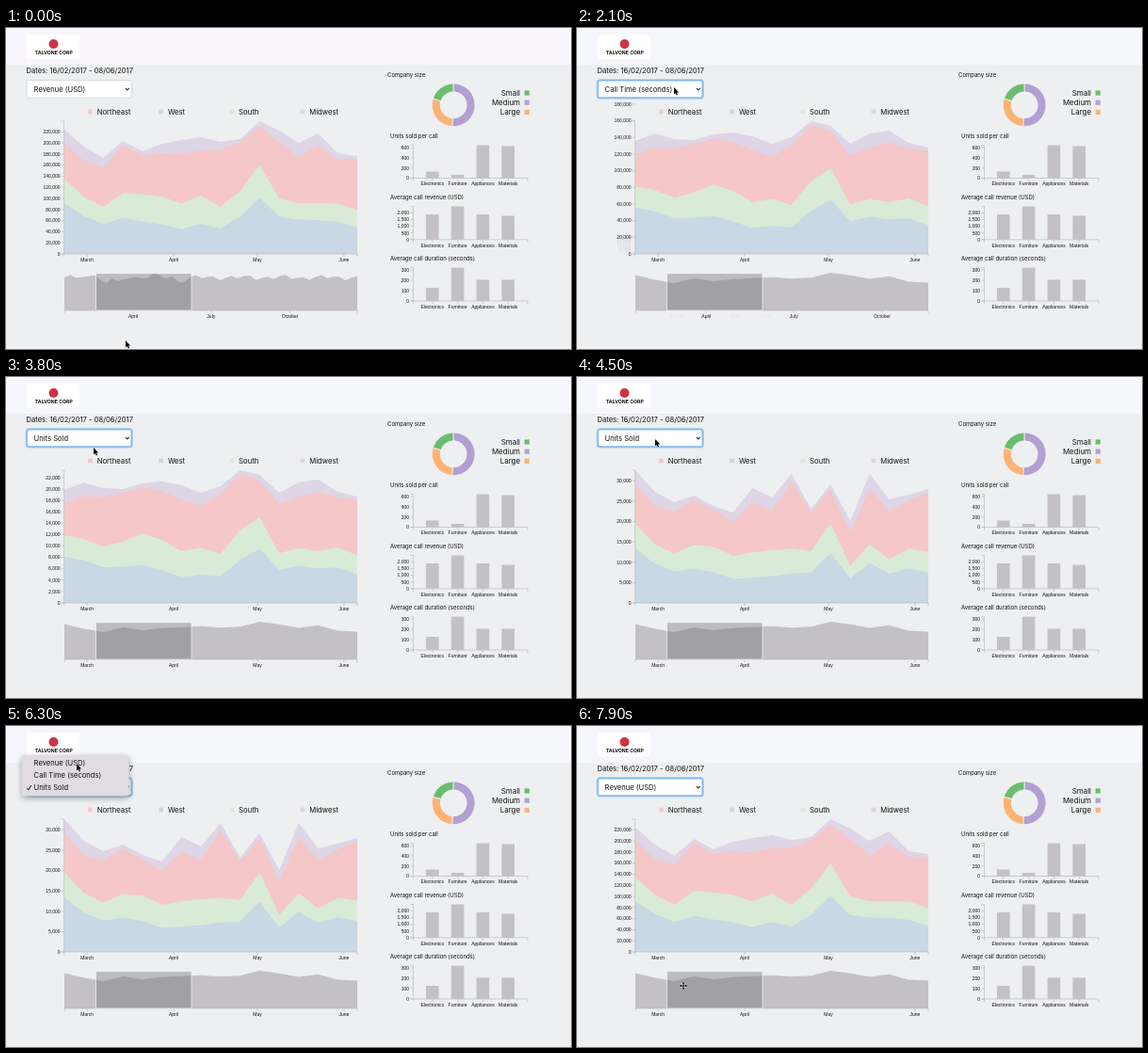
These frames come from a looping animation (600 by 341 pixels, 8 s). An HTML page with a canvas:

```html
<!DOCTYPE html>
<html lang="en">
<head>
<meta charset="utf-8">
<title>Sales dashboard</title>
<style>
html, body { margin: 0; width: 100%; height: 100%; overflow: hidden; background: #edeff0; }
canvas { display: block; }
</style>
</head>
<body>
<canvas id="stage" width="600" height="341"></canvas>
<script>
const c = document.getElementById('stage').getContext('2d');
const LOOP = 8000, TWEEN = 500;
const LEFT = 62, RIGHT = 373, BASE = 240, HEIGHT = 141;
const INK = '#111', AXIS = '#b3b4b8', GREY = '#c3c1c3';
const UI = 'Inter, sans-serif', PLAIN = '"Liberation Sans", Arial, sans-serif';
const OPTIONS = ['Revenue (USD)', 'Call Time (seconds)', 'Units Sold'];

// Weekly totals as heights on the stage
const SETS = [
  { max: 239000, step: 20000,
    total: [132, 114, 102, 120, 109, 117, 121, 124, 119, 122, 141, 131, 118, 128, 107, 104] },
  { max: 23300, step: 2000,
    total: [120, 128, 122, 121, 127, 129, 125, 117, 124, 141, 136, 117, 128, 131, 118, 113] },
  { max: 32640, step: 5000,
    total: [141, 118, 107, 114, 103, 96, 122, 112, 137, 100, 126, 87, 137, 110, 115, 121] }];
// Share of the two lower regions in each week's total
const SHARE = [.6, .53, .49, .54, .58, .52, .44, .5, .42, .55, .67, .45, .455, .42, .5, .45];
const CHANGES = [[0, 0], [1982, 1], [3880, 2], [6480, 0]];

// Stacked regions from the top down: colour and upper edge
const LAYERS = [
  ['#ded5e6', h => h],
  ['#f5c7c8', (h, i) => h - 9.5 - 6 * Math.cos(1.1 * i - 0.7)],
  ['#d9ebd7', (h, i) => h * SHARE[i]],
  ['#cad7e4', (h, i) => h * SHARE[i] * (0.59 + 0.09 * Math.cos(0.52 * i))]];
const LEGEND = { Northeast: 1, West: 3, South: 2, Midwest: 0 };

// Overview strip: sixteen weeks, or the whole year around them
const spring = SETS[0].total.map(h => h * 0.284);
const year = Array.from({ length: 50 }, (_, i) =>
  spring[i - 5] ?? 35 + 2 * Math.sin(2.1 * i) + 1.2 * Math.sin(0.9 * i));

// Days are counted from 1 April
const MONTHS = { '-31': 'March', 0: 'April', 30: 'May', 61: 'June', 91: 'July', 183: 'October' };
const QUARTERS = [0, 91, 183], SPRING = [-31, 0, 30, 61];

// open, close, selected option
const MENUS = [[850, 1700, 0], [2700, 3780, 1], [5400, 6400, 2]];
// start, end, x, y
const MOVES = [[0, 1, 127, 332], [150, 750, 92, 64], [1150, 1500, 99, 76], [1800, 2050, 103, 63],
  [2750, 3050, 93, 75], [3800, 4300, 83, 66], [5600, 6080, 75, 40], [7130, 7600, 113, 276]];

const mix = (a, b, e) => a + (b - a) * e;
const cubic = p => p < 0.5 ? 4 * p ** 3 : 1 - 4 * (1 - p) ** 3;
const range = (max, step) =>
  Array.from({ length: Math.floor(max / step) + 1 }, (_, i) => i * step);

function text(s, x, y, size, { align = 'left', color = INK, font = UI, weight = '' } = {}) {
  c.font = `${weight} ${size}px ${font}`;
  c.textAlign = align;
  c.fillStyle = color;
  c.fillText(s, x, y);
}
function rect(x, y, w, h, color) {
  c.fillStyle = color;
  c.fillRect(x, y, w, h);
}
function box(x, y, w, h, r, color) {
  c.beginPath();
  c.roundRect(x, y, w, h, r);
  c.fillStyle = color;
  c.fill();
}
function outline(color, width) {
  c.strokeStyle = color;
  c.lineWidth = width;
  c.stroke();
}
function line(color, width, ...p) {
  c.beginPath();
  for (let i = 0; i < p.length; i += 2) c.lineTo(p[i], p[i + 1]);
  outline(color, width);
}
function area(heights, base, color) {
  c.beginPath();
  c.moveTo(LEFT, base);
  heights.forEach((h, i) => c.lineTo(mix(LEFT, RIGHT, i / (heights.length - 1)), base - h));
  c.lineTo(RIGHT, base);
  c.fillStyle = color;
  c.fill();
}
function clipped(x, y, w, h, draw) {
  c.save();
  c.beginPath();
  c.rect(x, y, w, h);
  c.clip();
  draw();
  c.restore();
}

function axes(x, right, top, base) {
  line(AXIS, 0.6, x - 3, top, x, top, x, base, x - 3, base);
  line(AXIS, 0.6, x, base + 3, x, base, right, base, right, base + 3);
}
function yTick(x, y, value) {
  line(AXIS, 0.6, x - 3, y, x, y);
  text(value.toLocaleString('en-US'), x - 4.5, y + 1.8, 5, { align: 'right', font: PLAIN });
}
function xTick(x, y, label) {
  line(AXIS, 0.6, x, y, x, y + 3);
  text(label, x, y + 7.7, 5, { align: 'center', font: PLAIN });
}
// Old ticks fade out while new ones fade in
function blendTicks(from, to, e, draw) {
  for (const v of new Set([...from, ...to])) {
    c.globalAlpha = !to.includes(v) ? 1 - e : from.includes(v) ? 1 : e;
    draw(v);
  }
  c.globalAlpha = 1;
}

function header(t) {
  rect(0, 0, 600, 39, t < 100 ? '#f8f6fc' : '#f5f7fc');
  rect(22, 7, 56, 26, '#fff');
  c.beginPath();
  c.arc(50.5, 17, 5, 0, 7);
  c.fillStyle = '#cc3344';
  c.fill();
  text('TALVONE CORP', 50.8, 28.3, 5.2, { align: 'center', weight: 'bold' });
  text('Dates: 16/02/2017 - 08/06/2017', 21.5, 48.2, 7.6);
}

function mainChart(set, prev, e) {
  for (const [color, edge] of LAYERS) area(set.total.map(edge), BASE, color);
  axes(LEFT - 0.4, RIGHT, BASE - HEIGHT, BASE);
  const scale = HEIGHT * mix(1 / prev.max, 1 / set.max, e);
  clipped(20, 78, 360, 180, () => blendTicks(range(prev.max, prev.step), range(set.max, set.step), e,
    v => yTick(LEFT, BASE - v * scale, v)));
  SPRING.forEach(d => xTick(178 + 2.965 * d, BASE, MONTHS[d]));
  Object.entries(LEGEND).forEach(([name, layer], i) => {
    rect(87 + 75.2 * i, 86.6, 4.7, 4.7, LAYERS[layer][0]);
    text(name, 96.7 + 75.2 * i, 92, 7.7);
  });
}

function overview(zoomed, e) {
  area(zoomed ? spring : year, 300, GREY);
  line(AXIS, 0.6, LEFT, 303, LEFT, 300, RIGHT, 300, RIGHT, 303);
  clipped(20, 255, 360, 60, () => blendTicks(QUARTERS, zoomed ? SPRING : QUARTERS, e,
    d => xTick(mix(135, 178, e) + mix(0.91, 2.965, e) * d, 300, MONTHS[d])));
  c.beginPath();
  c.rect(95.5, 260.7, 101.5, 39.3);
  c.fillStyle = 'rgba(110,110,114,.4)';
  c.fill();
  outline('#f6f6f8', 0.7);
}

function donut() {
  text('Company size', 405, 52, 6);
  const parts = [['Small', '#6bbd6e', 0.797, 1], ['Medium', '#b1a0d1', 0, 0.51],
    ['Large', '#fbb375', 0.51, 0.797]];
  parts.forEach(([name, color, a, b], i) => {
    const from = (a - 0.25) * 2 * Math.PI, to = (b - 0.25) * 2 * Math.PI;
    c.beginPath();
    c.arc(475.2, 81.8, 22.9, from, to);
    c.arc(475.2, 81.8, 14, to, from, true);
    c.closePath();
    c.fillStyle = color;
    c.fill();
    outline('#f4f5f6', 0.8);
    text(name, 546, 72 + 10.2 * i, 7.9, { align: 'right' });
    rect(550.6, 66.4 + 10.2 * i, 5.2, 5.2, color);
  });
}

function bars(title, base, step, gap, values) {
  const scale = gap / step, max = Math.max(...values);
  text(title, 408, base - 42.6, 6);
  axes(432.5, 554, base - max * scale, base);
  range(max, step).forEach(v => yTick(432.5, base - v * scale, v));
  ['Electronics', 'Furniture', 'Appliances', 'Materials'].forEach((name, i) => {
    const h = values[i] * scale;
    rect(446 + 26.8 * i, base - h, 13.6, h, GREY);
    xTick(452.8 + 26.8 * i, base, name);
  });
}

function select(value, focused) {
  box(22, 55.5, 111.5, 18.7, 2.5, '#fff');
  if (focused) outline('rgba(90,165,245,.5)', 2.6);
  outline(focused ? '#76b3ee' : '#cdd2d8', 0.8);
  text(OPTIONS[value], 29.6, 67.6, 7.6);
  line('#333', 1.1, 126.8, 63.8, 128.8, 65.9, 130.8, 63.8);
}

function menu(selected, y, blink) {
  const top = 57 - 13 * selected;
  c.save();
  c.shadowColor = 'rgba(0,0,0,.35)';
  c.shadowBlur = 6;
  c.shadowOffsetY = 2;
  box(17, top, 113.5, 43.5, 3, '#e0dce2');
  c.restore();
  const hover = blink ? -1 : Math.floor((y - top - 2) / 13);
  OPTIONS.forEach((name, i) => {
    const row = top + 2 + 13 * i, color = i === hover ? '#fff' : INK;
    if (i === hover) box(20, row, 107.3, 13, 2, '#4290f6');
    text(name, 29.6, row + 9.2, 7.6, { color });
    if (i === selected) line(color, 1, 22.2, row + 6.8, 23.8, row + 9, 26.8, row + 4);
  });
}

function pointerAt(t) {
  const i = MOVES.findLastIndex(m => m[0] <= t);
  const [start, end, x, y] = MOVES[i], [, , x0, y0] = MOVES[Math.max(0, i - 1)];
  const p = Math.min(1, (t - start) / (end - start)), e = p * p * (3 - 2 * p);
  return [mix(x0, x, e), mix(y0, y, e)];
}
function pointer(x, y) {
  c.save();
  c.translate(x, y);
  c.lineJoin = 'round';
  c.strokeStyle = '#fff';
  c.fillStyle = '#000';
  if (x > 95 && x < 197 && y > 261 && y < 300) {
    const cross = new Path2D('M-3.5 0H3.5M0-3.5V3.5');
    const heads = new Path2D('M-4 0l1.7-1.5v3zM4 0l-1.7-1.5v3zM0-4l1.5 1.7h-3zM0 4l1.5-1.7h-3z');
    c.lineWidth = 2.2;
    c.stroke(cross);
    c.lineWidth = 1;
    c.stroke(heads);
    c.strokeStyle = '#000';
    c.stroke(cross);
    c.fill(heads);
  } else {
    const arrow = new Path2D('M0 0V7.4L1.7 5.9L2.9 8.4L4 7.9L3 5.5H5.2Z');
    c.lineWidth = 1;
    c.stroke(arrow);
    c.fill(arrow);
  }
  c.restore();
}

function draw(t) {
  const n = CHANGES.findLastIndex(ch => ch[0] <= t);
  const e = n ? cubic(Math.min(1, (t - CHANGES[n][0]) / TWEEN)) : 1;
  const set = SETS[CHANGES[n][1]], prev = SETS[CHANGES[Math.max(0, n - 1)][1]];
  const picked = MENUS.filter(m => m[1] <= t).length % OPTIONS.length;
  const open = MENUS.find(m => t >= m[0] && t < m[1]);
  const [x, y] = pointerAt(t);

  rect(0, 0, 600, 341, '#edeff0');
  header(t);
  mainChart(set, prev, e);
  overview(n > 0, n === 0 ? 0 : n === 1 ? e : 1);
  donut();
  bars('Units sold per call', 159.5, 200, 10.8, [130, 65, 648, 630]);
  bars('Average call revenue (USD)', 224.8, 500, 7.1, [1890, 2485, 1890, 1780]);
  bars('Average call duration (seconds)', 290, 100, 11, [127, 321, 205, 205]);
  select(picked, t >= MENUS[0][0]);
  if (open) menu(open[2], y, t >= 6250 && t < 6350);
  pointer(x, y);
}

function frame(now) {
  draw(now % LOOP);
  requestAnimationFrame(frame);
}
requestAnimationFrame(frame);
</script>
</body>
</html>
```
